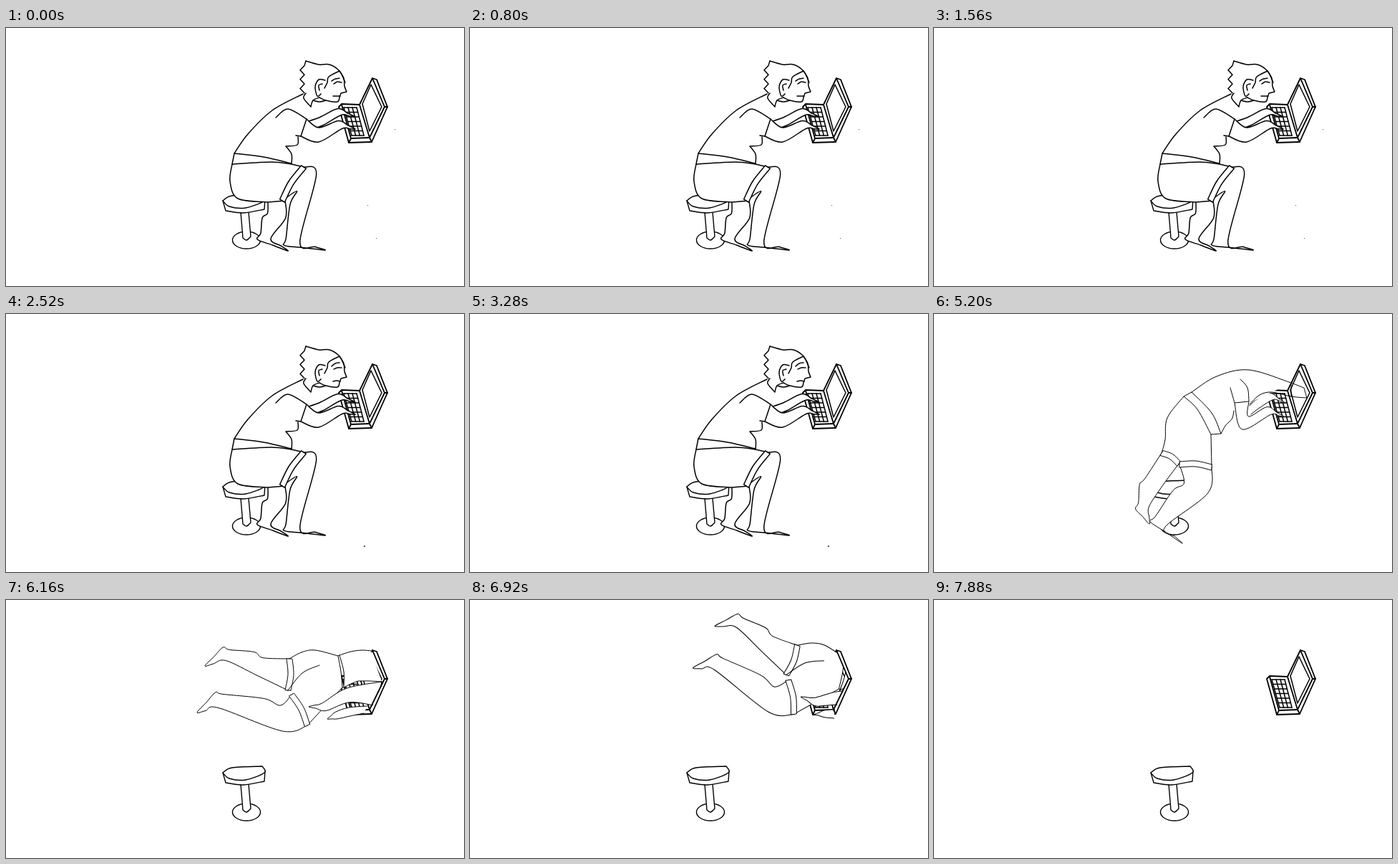
Recreate the animation shown at these times as an HTML page with a canvas. Size 640 by 360 pixels, loop 8000 ms.

```html
<!DOCTYPE html>
<html lang="en">
<head>
<meta charset="utf-8">
<title>Pulled into the laptop</title>
<style>
html, body { margin: 0; width: 100%; height: 100%; overflow: hidden; background: #fff; }
canvas { display: block; width: 640px; height: 360px; }
</style>
</head>
<body>
<canvas id="stage" width="640" height="360"></canvas>
<script>
const ctx = document.getElementById('stage').getContext('2d');
const LOOP = 8000, STEP = 192, TICK = 40;
const START = 19, BEND = 21, DIVE = 27, FLY = 29, SLIDE = 32, GONE = 41; // drawing counts
ctx.lineCap = ctx.lineJoin = 'round';

// A pose is a few joints as x, y pairs.
// Limbs: both edges of the cuff or sleeve, knee or elbow, ankle or wrist, tip.
// Torso: nape, back, back, waist, hem, waist, then up the front.
// Seat: front, middle and back of the waist, then two points of the bottom.
const sitting = {
  nearLeg: [416,194, 386,241, 420,216, 401,296, 446,310],
  farLeg: [390,241, 366,243, 378,262, 363,290, 394,311],
  nearArm: [420,127, 412,151, 437,149, 467,135, 488,141],
  farArm: [420,131, 424,143, 441,130, 466,117, 488,124],
  torso: [415,92, 372,115, 338,148, 319,175, 360,180, 399,189, 399,176, 391,165, 407,163, 408,152],
  seat: [399,190, 370,187, 316,190, 313,214, 324,238],
  sleeve: [377,125, 394,113, 405,150],
  farCuff: [0],
  crease: [0]
};
const leaning = {
  ...sitting,
  torso: [420,94, 378,115, 345,141, 321,175, 356,178, 402,190, 403,176, 399,167, 409,162, 409,153]
};
const diving = {
  nearLeg: [388,214, 343,210, 366,243, 316,290, 347,320],
  farLeg: [342,209, 318,194, 306,236, 293,266, 301,293],
  nearArm: [440,122, 420,124, 435,152, 468,135, 489,143],
  farArm: [441,128, 443,140, 453,125, 472,115, 491,124],
  torso: [499,96, 440,78, 395,87, 360,109, 388,138, 401,167, 407,156, 412,151, 417,145, 419,135],
  seat: [387,168, 368,133, 349,115, 326,145, 323,175],
  sleeve: [428,91, 438,103, 414,103],
  farCuff: [8],
  crease: [0]
};
const flying = {
  nearLeg: [421,175, 399,132, 385,165, 300,141, 267,157],
  farLeg: [394,126, 396,82, 355,93, 310,77, 278,92],
  nearArm: [518,148, 525,114, 478,133, 445,149, 423,149],
  farArm: [500,158, 505,148, 480,156, 462,161, 449,166],
  torso: [510,71, 497,70, 482,72, 466,77, 472,100, 472,122, 482,117, 492,113, 507,113, 525,114],
  seat: [470,122, 468,100, 464,78, 432,70, 413,73],
  sleeve: [525,114, 523,131, 525,114],
  farCuff: [8],
  crease: [1]
};

const lerp = (a, b, m) => a + (b - a) * m;
const mix = (a, b, m) => a.map((v, i) => lerp(v, b[i], m));
const between = (a, b, m) =>
  Object.fromEntries(Object.keys(a).map(key => [key, mix(a[key], b[key], m)]));
const clamp = v => Math.max(0, Math.min(1, v));
const pairs = p => Array.from({ length: p.length / 2 }, (_, i) => [p[2 * i], p[2 * i + 1]]);
const unit = (a, b) => {
  const d = Math.hypot(b[0] - a[0], b[1] - a[1]) || 1;
  return [(b[0] - a[0]) / d, (b[1] - a[1]) / d];
};
// Steps from p: `side` across direction u, `on` along it.
const off = (p, u, side, on = 0) =>
  [p[0] + u[1] * side + u[0] * on, p[1] - u[0] * side + u[1] * on];

// Smooth line through points; it breaks at the listed corners.
function curve(pts, fill = false, corners = []) {
  const bend = i => pts[i] && !corners.includes(i);
  ctx.beginPath();
  ctx.moveTo(...pts[0]);
  for (let i = 0; i < pts.length - 1; i++) {
    const b = pts[i], c = pts[i + 1];
    const a = bend(i) && pts[i - 1] || b, d = bend(i + 1) && pts[i + 2] || c;
    ctx.bezierCurveTo(b[0] + (c[0] - a[0]) / 6, b[1] + (c[1] - a[1]) / 6,
      c[0] - (d[0] - b[0]) / 6, c[1] - (d[1] - b[1]) / 6, ...c);
  }
  if (fill) { ctx.fillStyle = '#fff'; ctx.fill(); }
  ctx.stroke();
}

function poly(...p) {
  ctx.beginPath();
  for (const [x, y] of pairs(p)) ctx.lineTo(x, y);
  ctx.stroke();
}

// Tapered limb; a heel makes the end a foot, otherwise it is a hand.
function limb(joints, wide, thin, heel = 0) {
  const [p, q, mid, end, tip] = pairs(joints);
  const upper = unit(mix(p, q, 0.5), mid), lower = unit(mid, end);
  const bend = unit([0, 0], [upper[0] + lower[0], upper[1] + lower[1]]);
  const front = off(end, lower, thin), back = off(end, lower, -thin);
  const inner = off(mid, bend, -wide);
  const sole = off(end, lower, -thin, heel);
  const under = heel
    ? [mix(sole, tip, 0.5), sole, back, off(mix(inner, back, 0.3), lower, -5)]
    : [mix(back, tip, 0.6), back];
  curve([p, off(mid, bend, wide), front, mix(front, tip, 0.6), tip, ...under, inner, q], true);
}

function cuff(joints, size) {
  if (size < 1) return;
  const [p, q] = pairs(joints), u = unit(p, q), h = size / 2, mid = mix(p, q, 0.5);
  curve([off(p, u, -h), off(mid, u, -h - 3), off(q, u, -h), off(q, u, h),
    off(mid, u, h - 3), off(p, u, h), off(p, u, -h)], true, [2, 3, 5]);
}

function body(pose) {
  const [frontEdge] = pairs(pose.nearLeg), [farIn, farOut] = pairs(pose.farLeg);
  const torso = pairs(pose.torso), seat = pairs(pose.seat);
  const [hook, top, armpit] = pairs(pose.sleeve), [sleeveA, sleeveB] = pairs(pose.nearArm);

  limb(pose.farArm, 6, 5);
  limb(pose.farLeg, 13, 8, 10);
  limb(pose.nearLeg, 18, 10, 10);
  curve(torso, true, [3, 5, 7]);
  curve([torso[3], seat[2]]);
  curve([torso[5], seat[0]]);
  curve([frontEdge, ...seat, farOut, farIn], true, [1, 3, 6]);
  cuff(pose.farLeg, pose.farCuff[0]);
  cuff(pose.nearLeg, 8);
  const [c] = pose.crease;
  if (c > 0.5) curve([farIn, [farIn[0] + 20 * c, farIn[1] - 24 * c], [farIn[0] + 44 * c, farIn[1] - 35 * c]]);
  limb(pose.nearArm, 10, 6);
  curve([hook, top, sleeveA, sleeveB, armpit], true, [2, 3]);
}

// Mood: 0 calm, 1 tired, 2 scared.
function head(mood) {
  ctx.fillStyle = '#fff';
  ctx.beginPath();
  ctx.ellipse(441, 76, 27, 26, 0, 0, 7);
  ctx.fill();
  curve(pairs([466,60, 472,70, 473,81, 476,89, 468,91, 466,97, 463,103, 447,101, 438,97]), true, [3, 4]);
  curve(pairs([419,91, 416,98, 426,110, 429,101, 438,97]), true, [2]);
  curve(pairs([429,101, 438,103, 447,101]));
  curve(pairs([419,46, 437,51, 452,51, 466,60, 474,76]));
  curve(pairs([466,60, 451,68, 449,76, 445,84]));

  const spikes = [419, 46];
  for (let i = 1; i <= 7; i++) spikes.push(414 + (i % 2 ? 3 : -3), 46 + i * 6.4);
  poly(...spikes);

  curve(pairs([446,73, 437,72, 432,82, 435,95, 440,92]));
  curve(pairs([442,78, 437,80, 438,87]));
  curve(pairs([455,74, 460,71 - mood, 466,70 - mood]));
  curve(pairs([457,95, 462,95 - mood, 467,95]));
  if (mood < 2) curve([[458, 78], [463, 75 + mood], [469, 76]]);
  else {
    ctx.fillStyle = '#000';
    ctx.beginPath();
    ctx.ellipse(462, 77, 2, 4, 0, 0, 7);
    ctx.fill();
    curve([[457, 79], [461, 73], [466, 77]]);
  }
}

function stool() {
  ctx.lineWidth = 1.4;
  ctx.beginPath();
  ctx.ellipse(336, 296, 19.5, 12, 0, 0, 7);
  ctx.stroke();
  curve(pairs([328,257, 331,293, 336,296, 342,291, 339,257]), true, [1, 3]);
  curve(pairs([303,241, 307,255, 332,258, 361,253, 362,238]), true, [1, 3]);
  curve(pairs([303,241, 316,234, 358,232, 361,241, 335,251, 312,249, 303,241]), true, [2]);
}

function lidEdge() {
  ctx.lineWidth = 1.8;
  poly(512,70, 518,72, 533,110, 511,159, 508,153, 529,110, 512,70);
  poly(529,110, 533,110);
}

function laptop() {
  ctx.lineWidth = 1.8;
  poly(494,107, 469,106, 465,110, 479,160, 511,159);
  poly(469,107, 482,154, 508,153);
  poly(482,154, 479,160);
  poly(512,70, 494,107, 508,153);
  ctx.lineWidth = 1.5;
  poly(510,79, 498,106, 508,144, 525,110, 510,79);
  for (let i = 0; i <= 3; i++) poly(472 + 6 * i, 111, 483 + 5.7 * i, 150);
  for (let i = 0; i <= 6; i++) {
    const x = 472 + 11 * i / 6, y = 111 + 6.5 * i;
    poly(x, y, x + 18 - i / 6, y);
  }
}

function specks(size, ...p) {
  ctx.fillStyle = '#555';
  for (const [x, y] of pairs(p)) ctx.fillRect(x, y, size, size);
}

function type(n) {
  const alt = n % 2;
  if (alt) specks(2, 500, 323);
  else specks(1, 543, 141, 505, 247, 517, 293);
  ctx.lineWidth = 1.5;
  ctx.translate(0, -alt);
  body(sitting);
  head(alt);
}

function getPulled(n) {
  const m = clamp((n - BEND) / (DIVE - BEND)) ** 1.6;
  body(between(leaning, diving, m));
  if (n < 25) {
    ctx.translate(7 + 110 * m, 1 + 8 * m);
    head(2);
  } else neck();
  if (n === BEND) curve(pairs([480,78, 490,76, 501,80, 488,81, 480,78]), true, [2]);
}

function neck() {
  curve(pairs([441,126, 455,113, 472,109, 499,115, 521,117]));
  curve(pairs([521,117, 517,103, 499,96, 499,115]), false, [1, 2]);
}

function flyIn(n) {
  const k = Math.max(0, n - SLIDE);
  ctx.translate(510, 115);
  ctx.rotate(k * Math.PI / 40);
  ctx.translate(3 * k * k, 0);
  ctx.scale(1 + 0.06 * Math.max(0, Math.min(3, SLIDE - n)), 1);
  ctx.translate(-510, -115);
  body(between(diving, flying, clamp((n - DIVE) / (FLY - DIVE))));
}

// The screen swallows whatever passes its right edge.
function clipToScreen() {
  ctx.beginPath();
  for (const [x, y] of pairs([0,0, 512,0, 512,70, 529,110, 509,156, 509,360, 0,360])) ctx.lineTo(x, y);
  ctx.clip();
}

function draw(t) {
  const n = Math.floor(Math.floor(t / TICK) * TICK / STEP);
  ctx.fillStyle = '#fff';
  ctx.fillRect(0, 0, 640, 360);
  ctx.strokeStyle = '#000';
  stool();
  laptop();
  ctx.save();
  ctx.lineWidth = 1;
  if (n < START) type(n);
  else if (n < GONE) {
    clipToScreen();
    (n <= DIVE ? getPulled : flyIn)(n);
  }
  ctx.restore();
  lidEdge();
}

function frame() {
  draw(performance.now() % LOOP);
  requestAnimationFrame(frame);
}
frame();
</script>
</body>
</html>
```
